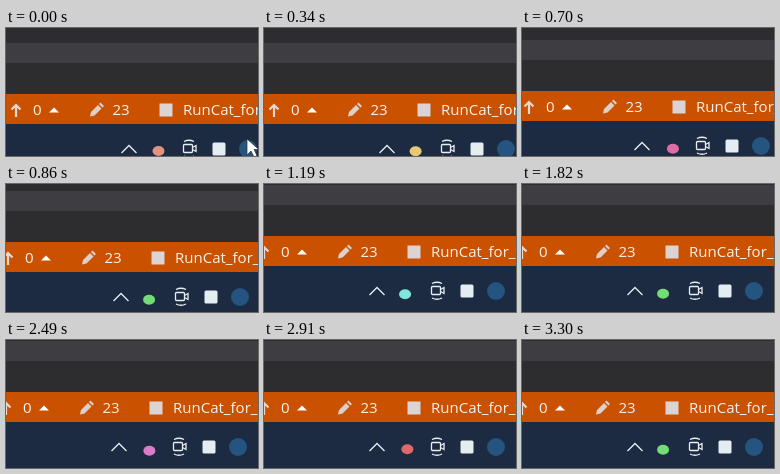
An HTML page that plays this animation: 252 by 128 pixels, repeating every 3.37 s.

```html
<!DOCTYPE html>
<html lang="en">
<head>
<meta charset="utf-8">
<title>Status bar and tray</title>
<style>
  html, body { margin: 0; width: 100%; height: 100%; overflow: hidden; background: #2d2d30; }
  svg { display: block; width: 252px; height: 128px; }
  text { font: 15px "Open Sans", "Noto Sans", sans-serif; fill: #fbf1ea; }
</style>
</head>
<body>
<svg viewBox="0 0 252 128">
  <g id="view">
    <rect x="-10" y="-10" width="290" height="160" fill="#2d2d30"/>
    <rect x="-10" y="15" width="290" height="20" fill="#3e3e42"/>
    <rect x="-10" y="66" width="290" height="30" fill="#ca5100"/>
    <rect x="-10" y="96" width="290" height="60" fill="#1c2b42"/>

    <g id="status">
      <path d="M10 89V77M5.500 81.500 10 77l4.500 4.500" fill="none" stroke="#e6d8d2" stroke-width="2.200"/>
      <text x="27" y="87">0</text>
      <path d="M43 84.500h10l-5-5z" fill="#fff"/>
      <path d="M84 88.500l1-4.500 7-7 3.500 3.500-7 7zM93 76l1.500-1.500 3.500 3.500-1.500 1.500z" fill="#ddd0cc"/>
      <text x="106.500" y="87">23</text>
      <rect x="153.500" y="75.500" width="13" height="13" fill="#dcd3d4"/>
      <text x="177" y="87">RunCat_for_windows</text>
    </g>

    <g id="tray" fill="none" stroke="#e8edf2" stroke-width="1.300">
      <path d="M115.500 125l7.500-7.500 7.500 7.500"/>
      <rect x="177.500" y="116.500" width="9" height="8" rx="1"/>
      <path d="M186.500 119.500l3.500-2v6l-3.500-2M178 113.500q5-2.500 10 0M178 128q5 2.500 10 0"/>
    </g>
    <rect x="206.500" y="114.500" width="13" height="13" rx="1.500" fill="#e4eef2"/>
    <circle cx="242" cy="121" r="9" fill="#24547f"/>
    <ellipse id="runner" rx="6" ry="5"/>
    <path id="pointer" d="M241 111v16l4-4 3 6 3-1.500-3-6h5z" fill="#fff" stroke="#25313c" stroke-width=".7"/>
  </g>
</svg>
<script>
  const LOOP = 3370;
  const COLORS = ["#e2937f", "#e8c872", "#74dc74", "#7fe6dc", "#86aee8",
                  "#bd83dc", "#dc7cc8", "#df6fd0", "#de6da6", "#dc6a6a"];
  // The runner gradually slows down: [time, colour steps so far].
  const PACE = [[0, 0], [340, 11], [860, 22], [1190, 33], [1820, 42], [2490, 46], [3300, 52], [3430, 53]];
  const PAN_X = [[620, 0], [860, -8], [1120, -10]];
  const PAN_Y = [[620, 0], [860, -8], [1120, -14]];

  const view = document.getElementById("view");
  const runner = document.getElementById("runner");
  const pointer = document.getElementById("pointer");

  function along(points, t) {
    if (t <= points[0][0]) return points[0][1];
    for (let i = 1; i < points.length; i++) {
      const [t0, a] = points[i - 1], [t1, b] = points[i];
      if (t <= t1) return a + (b - a) * (t - t0) / (t1 - t0);
    }
    return points[points.length - 1][1];
  }

  function draw(t) {
    const x = Math.round(along(PAN_X, t));
    const y = Math.round(along(PAN_Y, t));
    view.setAttribute("transform", `translate(${x} ${y})`);

    const step = Math.floor(along(PACE, t) + 1e-6) % COLORS.length;
    const angle = step / COLORS.length * 2 * Math.PI;
    runner.setAttribute("cx", 152.5 - 1.5 * Math.sin(angle));
    runner.setAttribute("cy", 124 - Math.cos(angle));
    runner.setAttribute("fill", COLORS[step]);

    pointer.setAttribute("visibility", t < 140 ? "visible" : "hidden");
    pointer.setAttribute("transform", t < 70 ? "" : "translate(5 5)");
  }

  const start = performance.now();
  function tick() {
    draw((performance.now() - start) % LOOP);
    requestAnimationFrame(tick);
  }
  draw(0);
  requestAnimationFrame(tick);
</script>
</body>
</html>
```
